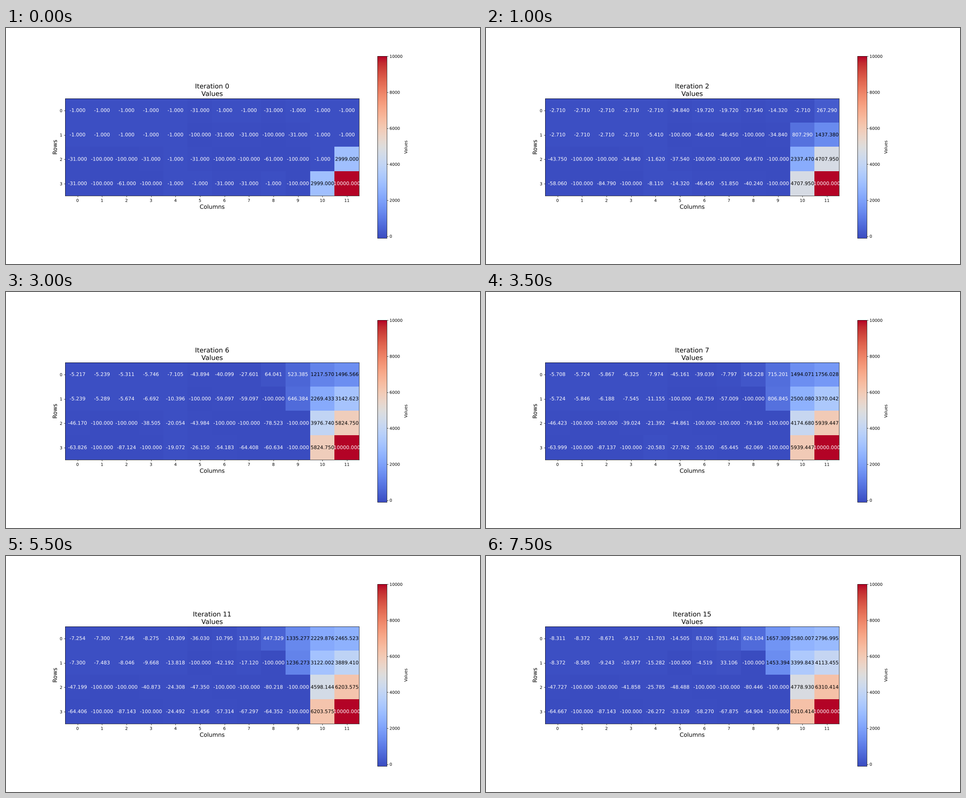
A matplotlib script that plays this animation: 1058x529 px, repeating every 8 s.

```python
import numpy as np
import matplotlib.pyplot as plt
from matplotlib.animation import FuncAnimation
from matplotlib.patheffects import Normal
from matplotlib.text import Text

plt.rcParams["text.hinting"] = "none"

ROWS, COLS = 4, 12
STEPS = 16
GAMMA, STEP_COST = 0.9, -1.0
TRAP, GOAL = -100.0, 10000.0
TRAPS = [(1, 5), (1, 8), (2, 1), (2, 2), (2, 6), (2, 7), (2, 9),
         (3, 1), (3, 3), (3, 9)]
END = (3, 11)
MOVES = [(0, -1), (1, 0), (0, 1), (-1, 0)]  # left, down, right, up


def inside(r, c):
    return 0 <= r < ROWS and 0 <= c < COLS


def landing(values, r, c, move):
    """Value of the cell reached; a wall leaves the walker in place."""
    dr, dc = MOVES[move % 4]
    return values[r + dr, c + dc] if inside(r + dr, c + dc) else values[r, c]


def best_value(values, r, c):
    """Best move when slipping to either side is as likely as going ahead."""
    return max(
        STEP_COST + GAMMA / 3 * sum(landing(values, r, c, a + s) for s in (-1, 0, 1))
        for a, (dr, dc) in enumerate(MOVES) if inside(r + dr, c + dc)
    )


def sweep(values):
    new = values.copy()
    for r, c in np.ndindex(ROWS, COLS):
        if (r, c) != END and (r, c) not in TRAPS:
            new[r, c] = best_value(values, r, c)
    return new


def run():
    values = np.zeros((ROWS, COLS))
    for cell in TRAPS:
        values[cell] = TRAP
    values[END] = GOAL
    history = []
    for _ in range(STEPS):
        values = sweep(values)
        history.append(values)
    return history


history = run()

fig, ax = plt.subplots(figsize=(16, 8), dpi=66.125)
image = ax.imshow(history[0], cmap="coolwarm", vmin=TRAP, vmax=GOAL)
fig.colorbar(image, ax=ax, label="Values")
ax.set_xticks(range(COLS))
ax.set_yticks(range(ROWS))
ax.set_xlabel("Columns", fontsize=14)
ax.set_ylabel("Rows", fontsize=14)
title = ax.set_title("", fontsize=16)
labels = {(r, c): ax.text(c, r, "", ha="center", va="center", fontsize=12)
          for r, c in np.ndindex(ROWS, COLS)}

# Draw text as outlines, so that it is not rounded to whole pixels.
fig.draw_without_rendering()
for text in fig.findobj(Text):
    text.set_path_effects([Normal()])


def text_color(value):
    red, green, blue, _ = image.cmap(image.norm(value))
    return "black" if 0.299 * red + 0.587 * green + 0.114 * blue > 0.5 else "white"


def draw(step):
    values = history[step]
    image.set_data(values)
    title.set_text(f"Iteration {step}\nValues")
    for cell, label in labels.items():
        label.set_text(f"{values[cell]:.3f}")
        label.set_color(text_color(values[cell]))
    return [image, title, *labels.values()]


anim = FuncAnimation(fig, draw, frames=STEPS, interval=500,
                     init_func=lambda: draw(0), repeat=True, repeat_delay=0)
plt.show()
```
